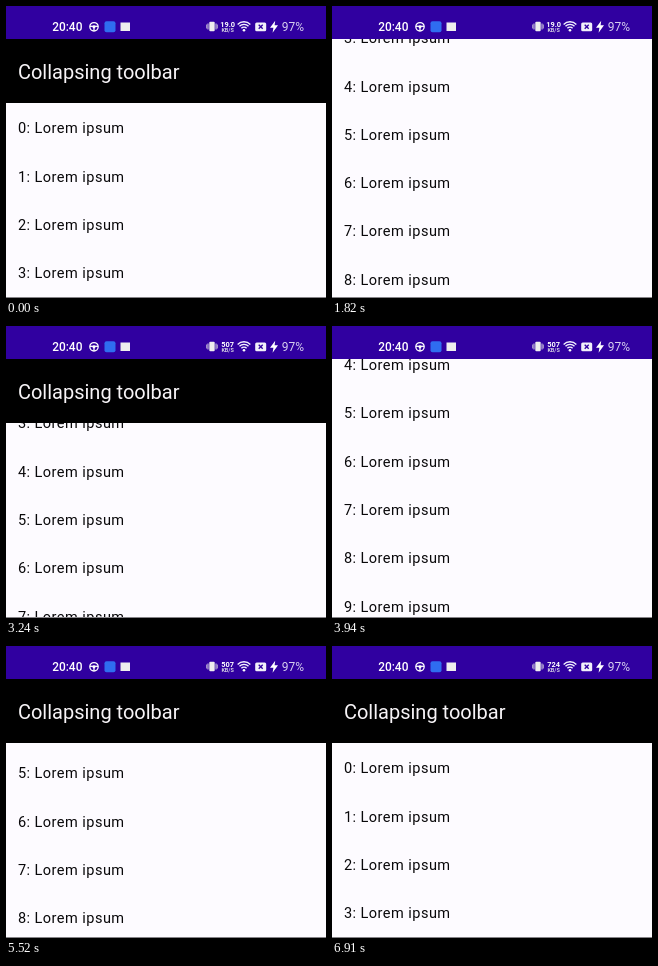
Animation of 320x292 px, one loop 6.94 s. Source, as an HTML page with a canvas:

```html
<!DOCTYPE html>
<html lang="en">
<head>
<meta charset="utf-8">
<title>Collapsing toolbar</title>
<style>
html, body { margin: 0; width: 100%; height: 100%; overflow: hidden; background: #fdfbff; }
canvas { display: block; width: 320px; height: 292px; }
</style>
</head>
<body>
<canvas id="stage" width="320" height="292"></canvas>
<script>
const ctx = document.getElementById('stage').getContext('2d');
const W = 320, H = 292, LOOP = 6940;
const STATUS_H = 33, BAR_H = 64, ROW_H = 48.3;
const PURPLE = '#3000a0';

// Scroll position over time: [ms, px]. Every reversal sits on a key.
const keys = [
  [0, 0], [820, 0], [1270, 22], [1500, 85], [1750, 210], [2000, 280],
  [2300, 305.5], [2350, 306], [2600, 301], [2910, 278], [3240, 170],
  [3450, 152], [3600, 160], [3800, 215], [4000, 300], [4200, 355],
  [4360, 374], [4760, 379], [4850, 379.5], [5030, 375], [5200, 335],
  [5380, 265], [5520, 236.5], [5670, 236.5], [5800, 215], [6000, 130],
  [6200, 50], [6390, 10], [6600, 2], [6900, 0], [LOOP, 0]
];

const clamp = (v, lo, hi) => Math.max(lo, Math.min(hi, v));
const slope = i => (keys[i + 1][1] - keys[i][1]) / (keys[i + 1][0] - keys[i][0]);

// Harmonic mean tangents keep each segment monotone.
const tangents = keys.map((key, i) => {
  if (i === 0 || i === keys.length - 1) return 0;
  const a = slope(i - 1), b = slope(i);
  return a * b <= 0 ? 0 : 2 * a * b / (a + b);
});

function segmentAt(i, time) {
  const [t0, y0] = keys[i], [t1, y1] = keys[i + 1];
  const d = t1 - t0, u = (time - t0) / d, v = 1 - u;
  return y0 * (1 + 2 * u) * v * v + tangents[i] * d * u * v * v
       + y1 * u * u * (3 - 2 * u) - tangents[i + 1] * d * u * u * v;
}

// The toolbar follows scroll deltas within its own height.
function poseAt(time) {
  let hidden = 0, scroll = 0;
  for (let i = 0; i < keys.length - 1 && keys[i][0] <= time; i++) {
    const next = segmentAt(i, Math.min(time, keys[i + 1][0]));
    hidden = clamp(hidden + next - scroll, 0, BAR_H);
    scroll = next;
  }
  return { scroll, hidden };
}

function label(text, x, y, font, color, align = 'left', spacing = 0) {
  ctx.font = font + ' Roboto, sans-serif';
  ctx.letterSpacing = spacing + 'px';
  ctx.textAlign = align;
  ctx.fillStyle = color;
  ctx.fillText(text, x, y);
}

function box(x, y, w, h, r, color) {
  ctx.fillStyle = color;
  ctx.beginPath();
  ctx.roundRect(x, y, w, h, r);
  ctx.fill();
}

function line(points, width, color) {
  ctx.strokeStyle = color;
  ctx.lineWidth = width;
  ctx.beginPath();
  points.forEach(([x, y]) => ctx.lineTo(x, y));
  ctx.stroke();
}

function arc(x, y, r, from, to, width, color) {
  ctx.strokeStyle = color;
  ctx.lineWidth = width;
  ctx.beginPath();
  ctx.arc(x, y, r, from, to);
  ctx.stroke();
}

function steeringWheel(x, y) {
  arc(x, y, 4.2, 0, Math.PI * 2, 1.3, '#fff');
  line([[x - 4, y - 0.5], [x + 4, y - 0.5]], 1.3, '#fff');
  line([[x, y], [x, y + 4]], 1.3, '#fff');
  box(x - 1.5, y - 1.5, 3, 3, 1.5, '#fff');
}

function vibrate(x, y) {
  box(x - 2.7, y - 4.8, 5.4, 9.6, 1, '#eee');
  for (const s of [-1, 1]) {
    line([[x + s * 4, y - 3], [x + s * 4, y + 3]], 0.9, '#eee');
    line([[x + s * 5.3, y - 2], [x + s * 5.3, y + 2]], 0.8, '#ddd');
  }
}

function wifi(x, y) {
  for (const r of [3.7, 6.4, 9]) {
    arc(x, y, r, -Math.PI * 0.75, -Math.PI * 0.25, 1.4, '#f4f2ff');
  }
  box(x - 1.3, y - 1.8, 2.6, 2.6, 1.3, '#fff');
}

function crossedCard(x, y) {
  box(x - 5.5, y - 4.4, 11, 8.8, 1.5, '#f2f0fa');
  line([[x - 2, y - 2], [x + 2, y + 2]], 1.3, PURPLE);
  line([[x + 2, y - 2], [x - 2, y + 2]], 1.3, PURPLE);
}

function bolt(x, y) {
  ctx.fillStyle = '#fff';
  ctx.beginPath();
  [[1.2, -6], [-4, 1], [-0.6, 1], [-1.4, 6], [4, -1.5], [0.6, -1.5]]
    .forEach(([dx, dy]) => ctx.lineTo(x + dx, y + dy));
  ctx.fill();
}

function statusBar(time) {
  ctx.fillStyle = PURPLE;
  ctx.fillRect(0, 0, W, STATUS_H);
  label('20:40', 46.2, 25.2, '500 11.9px', '#fff');
  steeringWheel(88, 20.8);
  box(98.5, 15.3, 11, 11, 2, '#2f6df0');
  box(114.5, 16.5, 9.5, 8.5, 0, '#eee');
  vibrate(206, 20.5);
  const speed = time < 1900 ? '19.0' : time < 5900 ? '507' : '724';
  label(speed, 221.6, 20.9, '700 7.4px', '#fff', 'center');
  label('KB/S', 221.6, 26.4, '500 5.5px', '#eee', 'center');
  wifi(238, 24.8);
  crossedCard(254.7, 20.8);
  bolt(268, 20.7);
  label('97%', 275.8, 25.2, '400 12px', '#d8d0f0');
}

function draw(time) {
  const { scroll, hidden } = poseAt(time);
  ctx.fillStyle = '#fdfbff';
  ctx.fillRect(0, 0, W, H);

  const first = Math.max(0, Math.floor((scroll - 100) / ROW_H));
  for (let i = first; i < first + 8; i++) {
    label(`${i}: Lorem ipsum`, 11.9, 127.3 + i * ROW_H - scroll,
      '400 14.56px', '#09080a', 'left', 0.456);
  }
  ctx.fillStyle = '#858387';
  ctx.fillRect(0, 291, W, 1);

  ctx.fillStyle = '#000';
  ctx.fillRect(0, STATUS_H - hidden, W, BAR_H);
  label('Collapsing toolbar', 11.9, 73.2 - hidden, '400 20px', '#f7f4f7');
  statusBar(time);
}

const start = performance.now();
function frame() {
  draw((performance.now() - start) % LOOP);
  requestAnimationFrame(frame);
}
frame();
</script>
</body>
</html>
```
